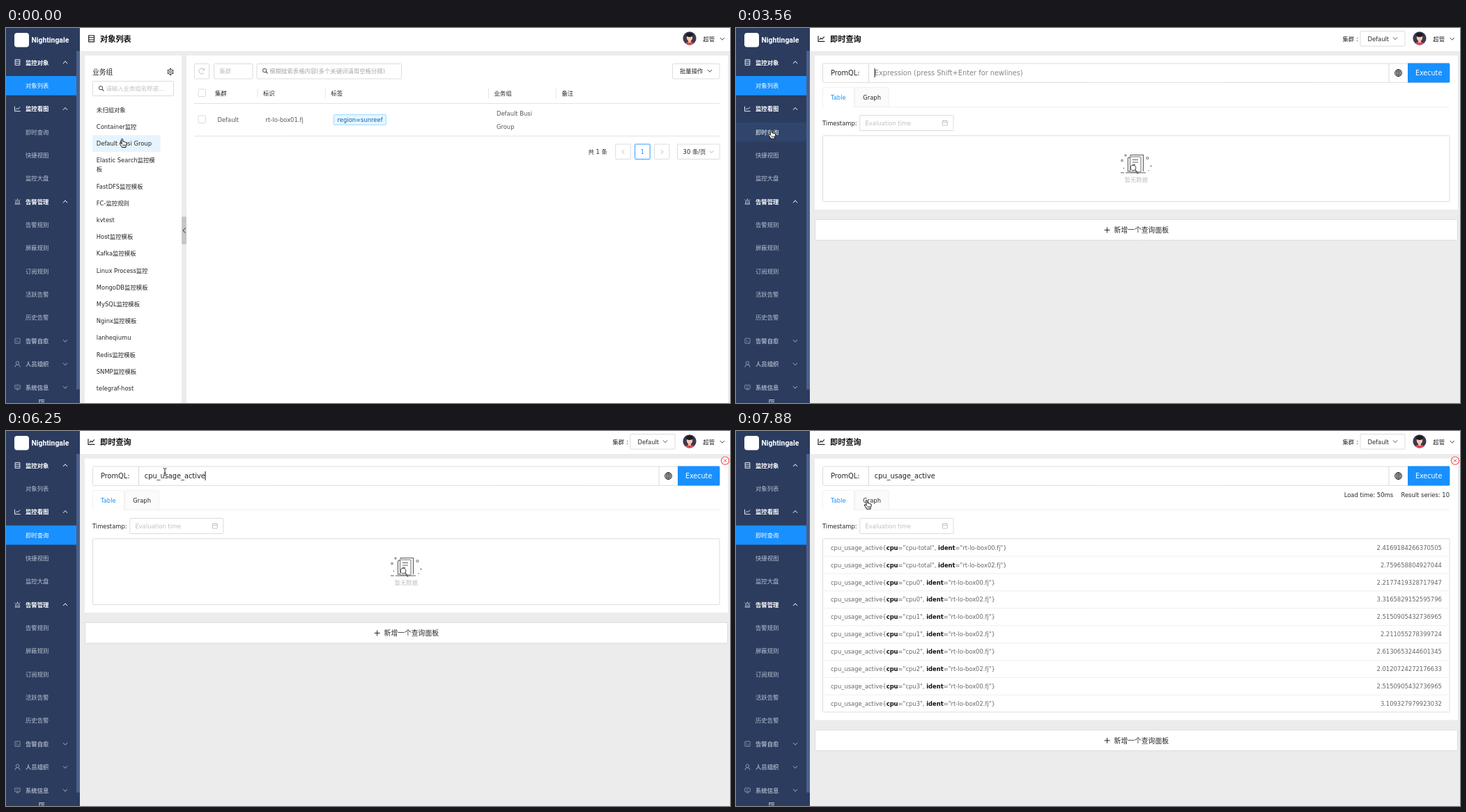
An HTML page with a canvas for the animation above (8000 ms loop, 1039 by 539 pixels).

```html
<!DOCTYPE html>
<html lang="zh-CN">
<head>
<meta charset="utf-8">
<title>监控</title>
<style>
html, body { margin: 0; width: 100%; height: 100%; overflow: hidden; background: #ececec; }
canvas { display: block; width: 1039px; height: 539px; }
</style>
</head>
<body>
<canvas id="stage"></canvas>
<script>
const W = 1039, H = 539, LOOP = 8000, TICK = 148.7;
const FONT = '"DejaVu Sans", "Noto Sans CJK SC", "Noto Sans CJK", sans-serif';
const BLUE = '#1890ff', NAVY = '#2b3c5f', LINE = '#d9d9d9', PALE = '#efefef';
const INK = '#262626', GREY = '#666', HINT = '#bfbfbf';
const canvas = document.getElementById('stage');
const dpr = window.devicePixelRatio || 1;
canvas.width = W * dpr;
canvas.height = H * dpr;
const c = canvas.getContext('2d');

// Drawing helpers; y of text is its visual centre
function text(s, x, y, color = INK, size = 8.4, weight = 400, align = 'left') {
  c.font = `${weight} ${size}px ${FONT}`;
  c.fillStyle = color;
  c.textAlign = align;
  c.fillText(s, x, y + size * 0.37);
  return c.measureText(s).width;
}
function box(x, y, w, h, fill, stroke, r = 0) {
  c.beginPath();
  c.roundRect(x, y, w, h, r);
  if (fill) { c.fillStyle = fill; c.fill(); }
  if (stroke) { c.strokeStyle = stroke; c.lineWidth = 0.9; c.stroke(); }
}
function path(pts, color, width = 1, close = false, fill) {
  c.beginPath();
  for (let i = 0; i < pts.length; i += 2) c.lineTo(pts[i], pts[i + 1]);
  if (close) c.closePath();
  if (fill) { c.fillStyle = fill; c.fill(); }
  c.strokeStyle = color;
  c.lineWidth = width;
  c.stroke();
}
function ring(x, y, r, color, width = 1, from = 0, to = Math.PI * 2) {
  c.beginPath();
  c.arc(x, y, r, from, to);
  c.strokeStyle = color;
  c.lineWidth = width;
  c.stroke();
}
function disc(x, y, r, color) {
  c.beginPath();
  c.arc(x, y, r, 0, Math.PI * 2);
  c.fillStyle = color;
  c.fill();
}
function chevron(x, y, dir, color, s = 3) {
  const d = s * 0.55 * dir;
  path([x - s, y - d, x, y + d, x + s, y - d], color, 1);
}
function sideChevron(x, y, dir, color, s = 3) {
  path([x - s * 0.55 * dir, y - s, x + s * 0.55 * dir, y, x - s * 0.55 * dir, y + s], color, 1);
}
function magnifier(x, y, color) {
  ring(x - 0.6, y - 0.6, 2.7, color);
  path([x + 1.4, y + 1.4, x + 3.8, y + 3.8], color, 1.1);
}

const icons = {
  list(x, y, col, s = 1) {
    path([x - 3.4 * s, y - 4 * s, x + 3.4 * s, y - 4 * s, x + 3.4 * s, y + 4 * s, x - 3.4 * s, y + 4 * s], col, s, true);
    for (const d of [-1.4, 1.4]) path([x - 3.4 * s, y + d * s, x + 3.4 * s, y + d * s], col, 0.9 * s);
  },
  chart(x, y, col, s = 1) {
    path([x - 4 * s, y - 3.5 * s, x - 4 * s, y + 3.5 * s, x + 4.2 * s, y + 3.5 * s], col, s);
    path([x - 2.4 * s, y + 1.4 * s, x - 0.6 * s, y - 0.8 * s, x + 0.8 * s, y + 0.6 * s, x + 3.6 * s, y - 2.6 * s], col, s);
  },
  alarm(x, y, col) {
    path([x - 2.4, y + 2.6, x - 2.4, y - 1, x - 1, y - 2.2, x + 1, y - 2.2, x + 2.4, y - 1, x + 2.4, y + 2.6], col, 0.9);
    path([x - 3.8, y + 3.4, x + 3.8, y + 3.4], col);
    path([x, y - 4.2, x, y - 3.2], col);
    path([x - 4, y - 2.8, x - 3.2, y - 2.2], col);
    path([x + 4, y - 2.8, x + 3.2, y - 2.2], col);
    path([x, y, x, y + 1.6], col, 0.9);
  },
  shell(x, y, col) {
    box(x - 3.6, y - 3.6, 7.2, 7.2, null, col, 0.5);
    path([x - 1.9, y - 1.6, x - 0.3, y, x - 1.9, y + 1.6], col, 0.8);
    path([x + 0.4, y + 1.7, x + 2.2, y + 1.7], col, 0.8);
  },
  person(x, y, col) {
    ring(x, y - 1.7, 2.2, col);
    ring(x, y + 4.4, 3.6, col, 1, Math.PI, Math.PI * 2);
  },
  screen(x, y, col) {
    box(x - 3.8, y - 3.2, 7.6, 5.2, null, col, 0.5);
    path([x - 2, y + 3.5, x + 2, y + 3.5], col, 0.9);
    path([x - 1.8, y - 0.6, x + 1.8, y - 0.6], col, 0.8);
  }
};

const menu = [
  ['监控对象', 'list', 1], ['对象列表'],
  ['监控看图', 'chart', 1], ['即时查询'], ['快捷视图'], ['监控大盘'],
  ['告警管理', 'alarm', 1], ['告警规则'], ['屏蔽规则'], ['订阅规则'], ['活跃告警'], ['历史告警'],
  ['告警自愈', 'shell', 0], ['人员组织', 'person', 0], ['系统信息', 'screen', 0]
];

function sidebar(k, cur) {
  box(0, 0, 106, H, NAVY);
  box(101, 33, 5, 487, '#4b608b', null, [0, 0, 2.5, 2.5]);
  box(12, 7, 21, 20.5, '#fff', null, 4);
  c.font = '700 10.4px Roboto, "Open Sans", sans-serif';
  c.fillStyle = '#fff';
  c.textAlign = 'left';
  c.fillText('Nightingale', 36.5, 20.8);

  const moved = Math.min(1, Math.max(0, (k - 24) / 2));
  menu.forEach(([label, icon, open], i) => {
    const y = 49.4 + 33.36 * i;
    if (icon) {
      const col = open ? '#fff' : '#a3adbf';
      icons[icon](16.5, y, open ? '#e3e7ee' : '#8c98ad');
      text(label, 28, y, col, 8.4, 700);
      chevron(85, y, open ? -1 : 1, col);
      return;
    }
    const share = i === 1 ? 1 - moved : i === 3 ? moved : 0;
    const over = cur.x < 101 && Math.abs(cur.y - y) < 13.8;
    if (over && k >= 24) box(0, y - 13.8, 101, 27.8, '#2f456c');
    c.globalAlpha = share;
    if (share) box(0, y - 13.8, 101, 27.8, BLUE);
    c.globalAlpha = 1;
    text(label, 28, y, share > 0.4 || over ? '#fff' : '#b8c0ce', 8.4, share > 0.4 || over ? 500 : 400);
  });
  path([47, 534.7, 55, 534.7], '#dfe4ec');
  path([50, 537.2, 55, 537.2], '#dfe4ec');
  path([49, 535.8, 47, 537.2, 49, 538.6], '#dfe4ec', 0.8);
}

function header(title, icon, withSelect) {
  box(106, 0, W - 106, 33, '#fff');
  icons[icon](122.6, 15.3, '#222', 1.15);
  text(title, 135, 15.8, '#111', 11.2, 700);
  if (withSelect) {
    text('集群 :', 870.5, 15.6);
    box(896, 4.5, 64, 21.5, '#fff', LINE, 1);
    text('Default', 906.5, 15.4);
    chevron(946, 15, 1, '#555');
  }
  // Faceless avatar
  c.save();
  c.beginPath();
  c.arc(981, 14.8, 9.6, 0, Math.PI * 2);
  c.clip();
  box(970, 4, 22, 22, '#3b3a4d');
  c.beginPath();
  c.ellipse(981, 25, 8, 5.2, 0, 0, Math.PI * 2);
  c.fillStyle = '#d8485a';
  c.fill();
  box(979, 16, 4, 5, '#eeb59c');
  c.beginPath();
  c.ellipse(981, 13.8, 4.2, 5, 0, 0, Math.PI * 2);
  c.fillStyle = '#f6c8b1';
  c.fill();
  c.beginPath();
  c.ellipse(981, 9.8, 5.2, 3.2, 0, 0, Math.PI * 2);
  c.fillStyle = '#1d1b27';
  c.fill();
  c.restore();
  text('超管', 1000.3, 16);
  chevron(1027.8, 15.6, 1, '#444');
}

const groups = ['未归组对象', 'Container监控', 'Default Busi Group', 'Elastic Search监控模|板', 'FastDFS监控模板',
  'FC-监控规则', 'kvtest', 'Host监控模板', 'Kafka监控模板', 'Linux Process监控', 'MongoDB监控模板', 'MySQL监控模板',
  'Nginx监控模板', 'lanheqiumu', 'Redis监控模板', 'SNMP监控模板', 'telegraf-host'];

function groupPanel(k, cur) {
  box(113, 39.5, 139, 500, '#fff');
  text('业务组', 124, 63.4, INK, 9.8, 500);
  for (let i = 0; i < 6; i++) {
    const a = i * Math.PI / 3 + Math.PI / 6;
    path([236 + 3.6 * Math.cos(a), 63 + 3.6 * Math.sin(a), 236 + 4.9 * Math.cos(a), 63 + 4.9 * Math.sin(a)], '#444', 1.9);
  }
  ring(236, 63, 3.6, '#444');
  ring(236, 63, 1.5, '#444', 0.9);
  box(124.5, 76.5, 116, 21, '#fff', cur.kind === 'beam' ? '#40a9ff' : LINE, 1);
  magnifier(136.6, 86.8, '#444');
  text('请输入业务组名称进...', 143.5, 87, HINT);
  let y = 117.5;
  for (const name of groups) {
    if (name.startsWith('Default')) box(124, y - 12, 97.6, 24, k < 4 ? '#e6f4ff' : '#e7f0fd');
    name.split('|').forEach((part, i) => text(part, 129.8, y + 13.2 * i));
    y += name.includes('|') ? 37.4 : 24.2;
  }
  box(252, 271, 7, 40, '#c6c6c6', null, 2);
  sideChevron(255.8, 291, -1, '#333', 3.6);
}

function objectPage(k, cur) {
  header('对象列表', 'list', false);
  groupPanel(k, cur);
  box(259, 39.5, 777, 500, '#fff');

  box(270.5, 51.5, 21, 21.5, '#fff', LINE, 1);
  ring(280.8, 62, 4, HINT, 1, 0.6, Math.PI * 2 - 0.5);
  path([284.8, 58.2, 284.6, 60.6, 282.2, 60.4], HINT, 1);
  box(298.5, 51.5, 55.5, 21.5, '#fff', LINE, 1);
  text('集群', 306.5, 62, HINT);
  box(360, 51.5, 207.5, 21.5, '#fff', LINE, 1);
  magnifier(371.8, 61.6, '#444');
  text('模糊搜索表格内容(多个关键词请用空格分隔)', 378.3, 62, '#a6a6a6');
  box(956.5, 51.5, 67.5, 21.5, '#fff', LINE, 1);
  text('批量操作', 967, 62);
  chevron(1010, 61.6, 1, '#444');

  const cols = [['集群', 300], ['标识', 369], ['标签', 466.3], ['业务组', 700.5], ['备注', 797.4]];
  cols.forEach(([name, x], i) => {
    text(name, x, 94, INK, 8.4, 500);
    if (i) path([x - 8, 87, x - 8, 101], '#e6e6e6');
  });
  for (const y of [88, 126]) box(276, y, 10.5, 10.5, '#fff', LINE, 1);
  path([270, 108.5, 1024, 108.5], '#e2e2e2');
  path([270, 155.3, 1024, 155.3], '#e2e2e2');
  text('Default', 303.5, 132, '#555');
  text('rt-lo-box01.fj', 372.6, 132, '#555');
  box(470.3, 124.6, 75, 14.6, '#e6f7ff', '#91d5ff', 1);
  text('region=sunreef', 475.6, 132, '#0b5cad');
  text('Default Busi', 704, 122.6, '#555');
  text('Group', 704, 142, '#555');

  text('共 1 条', 835.5, 178);
  box(874.8, 167, 21.6, 21.5, '#fff', LINE, 1);
  sideChevron(885.5, 178, -1, HINT);
  box(902.6, 167, 21.6, 21.5, '#fff', BLUE, 1);
  text('1', 913.4, 178, BLUE, 8.4, 500, 'center');
  box(930.4, 167, 21.6, 21.5, '#fff', LINE, 1);
  sideChevron(941.4, 178, 1, HINT);
  box(963.5, 167, 60.8, 21.5, '#fff', LINE, 1);
  text('30 条/页', 971.6, 178);
  chevron(1012.4, 178, 1, HINT);
}

function emptyArt() {
  const col = '#5c5c5c';
  path([552, 208, 557, 208], col);
  path([559, 208, 588, 208], col);
  path([565, 206, 562.5, 206, 562.5, 187, 565.5, 185], col, 1.1);
  path([566, 184, 566, 182.5, 584.5, 182.5, 584.5, 206], col, 1.1);
  box(565.5, 185, 15.5, 22, '#fff', col, 1);
  for (const [y, w] of [[189.5, 8], [193, 8], [196.5, 4]]) path([569, y, 569 + w, y], col);
  ring(570, 201, 3.8, col, 1.2);
  path([572.8, 203.8, 577, 209.5], col, 1.6);
  ring(554, 190.5, 1.4, col, 0.9);
  ring(590.5, 187, 1.6, col, 0.9);
  path([557, 183, 561, 183], col, 0.8);
  path([559, 181, 559, 185], col, 0.8);
  disc(556.5, 201.5, 0.8, col);
  disc(595.5, 198.5, 0.9, col);
  disc(592, 205, 0.7, col);
  text('暂无数据', 574.3, 218.3, HINT, 8.4, 400, 'center');
}

const values = ['2.4169184266370505', '2.759658804927044', '2.2177419328717947', '3.3165829152595796',
  '2.5150905432736965', '2.211055278399724', '2.6130653244601345', '2.0120724272176633',
  '2.5150905432736965', '3.109327979923032'];

function results() {
  text('Load time: 50ms', 943, 92, INK, 8.4, 400, 'right');
  text('Result series: 10', 1024, 92, INK, 8.4, 400, 'right');
  values.forEach((v, i) => {
    const y = 167.6 + 24.92 * i;
    const cpu = i < 2 ? 'cpu-total' : 'cpu' + ((i >> 1) - 1);
    const parts = ['cpu_usage_active{', '*cpu', `="${cpu}", `, '*ident', `="rt-lo-box0${i % 2 * 2}.fj"}`];
    let x = 136;
    for (const p of parts) {
      const key = p[0] === '*';
      x += text(key ? p.slice(1) : p, x, y, key ? '#111' : GREY, 8.4, key ? 700 : 400);
    }
    text(v, 1012.8, y, GREY, 8.4, 400, 'right');
    if (i) path([124, y - 12.5, 1024, y - 12.5], PALE);
  });
}

const metrics = ['active', 'guest', 'guest_nice', 'idle', 'iowait', 'irq', 'nice', 'softirq', 'steal', 'system', 'user'];

function suggestions(typed) {
  box(198.5, 76, 396, 238.5, '#fff', '#ddd');
  metrics.forEach((m, i) => {
    const y = 87 + 21.6 * i;
    if (!i) box(199, y - 10.5, 395, 21.4, '#d6ebff');
    const w = text(typed, 210, y, '#111', 8.4, 700);
    text(('cpu_usage_' + m).slice(typed.length), 210 + w, y, '#333');
  });
}

// Caret flips every few ticks
const flips = [24, 28, 31, 34, 36, 40, 42, 45, 48, 51];
const caretOn = k => flips.filter(f => f <= k).length % 2 === 1;

function queryPage(k, cur) {
  const done = k >= 44;
  const typed = k >= 42 ? 'cpu_usage_active' : k >= 37 ? 'cpu' : k >= 36 ? 'cp' : '';
  const grow = done ? 154.5 : 0;
  header('即时查询', 'chart', true);
  box(113, 39.5, 923, 221.5 + grow, '#fff');

  box(124.5, 51, 899.5, 27.3, '#fff', LINE, 1.5);
  path([190.5, 51, 190.5, 78], LINE);
  path([937, 51, 937, 78], LINE);
  text('PromQL:', 136, 64.7, INK, 9.8);
  text(typed || 'Expression (press Shift+Enter for newlines)', 198.8, 64.6, typed ? '#222' : '#858585', 9.8);
  c.font = `9.8px ${FONT}`;
  const caretX = 198.8 + c.measureText(typed).width;
  if (caretOn(k)) box(caretX - 0.2, 58, 1, 13, '#111');
  ring(950.5, 64.6, 5, '#222', 0.9);
  c.beginPath();
  c.ellipse(950.5, 64.6, 2.3, 5, 0, 0, Math.PI * 2);
  c.stroke();
  path([950.5, 59.6, 950.5, 69.6], '#222', 0.8);
  for (const [d, w] of [[-2.3, 4.4], [0, 5], [2.3, 4.4]]) path([950.5 - w, 64.6 + d, 950.5 + w, 64.6 + d], '#222', 0.8);
  box(964, 50.6, 60.3, 28, BLUE, null, [0, 1.5, 1.5, 0]);
  text('Execute', 994.1, 64.7, '#fff', 9.6, 400, 'center');

  path([124, 113.3, 1024, 113.3], PALE);
  box(124.5, 85.5, 44.8, 28, '#fff', PALE, [1.5, 1.5, 0, 0]);
  path([125, 113.4, 169, 113.4], '#fff', 1.4);
  box(170.7, 85.5, 48.6, 27.8, '#fbfbfb', PALE, [1.5, 1.5, 0, 0]);
  text('Table', 136, 99.8, BLUE);
  text('Graph', 182.3, 99.8);

  text('Timestamp:', 124, 136.6);
  box(177.7, 125.5, 134.3, 22, '#fff', LINE, 1);
  text('Evaluation time', 185.5, 136.6, HINT);
  box(296.3, 133.4, 7, 6.6, null, HINT, 0.5);
  path([296.3, 135.8, 303.3, 135.8], HINT, 0.9);
  for (const x of [298.2, 301.4]) path([x, 132.2, x, 134.2], HINT, 0.9);

  box(124.5, 154.8, 899.5, done ? 249.2 : 94.7, '#fff', LINE, 1);
  if (done) results(); else emptyArt();

  box(113.5, 275.3 + grow, 922, 29.8, '#fff', LINE, 1);
  const y = 290.4 + grow;
  path([528.6, y, 536.6, y], '#222');
  path([532.6, y - 4, 532.6, y + 4], '#222');
  text('新增一个查询面板', 542.6, y + 0.1, INK, 9.8);

  if (cur.x > 113) {
    disc(1032, 42.6, 6, '#fff');
    ring(1032, 42.6, 5.6, '#f5484d', 1.1);
    path([1029.8, 40.4, 1034.2, 44.8], '#f5484d');
    path([1034.2, 40.4, 1029.8, 44.8], '#f5484d');
  }
  if (k >= 36 && k < 42) suggestions(typed);
}

// Pointer moves: start tick, end tick, start, bend, end
const moves = [
  [3, 8, 167, 159, 195, 34, 211, 127],
  [11, 21, 211, 127, 135, 185, 50.5, 146.5],
  [27, 31, 50.5, 146.5, 130, 70, 228, 59],
  [47, 53, 228, 59, 44, 153, 188, 99.5]
];

function pointer(k) {
  const m = moves.filter(v => v[0] <= k).pop() || moves[0];
  const [from, to, x0, y0, x1, y1, x2, y2] = m;
  let u = Math.min(1, Math.max(0, (k - from) / (to - from)));
  if (from === 11) u = 1 - (1 - u) ** 2;
  const v = 1 - u;
  const x = v * v * x0 + 2 * u * v * x1 + u * u * x2;
  const y = v * v * y0 + 2 * u * v * y1 + u * u * y2;
  const inside = (l, t, r, b) => x >= l && x <= r && y >= t && y <= b;
  const first = k < 24;
  let kind = 'arrow';
  if (x < 101 || (first ? inside(124, 106, 222, 530) : inside(124, 85, 220, 113))) kind = 'hand';
  else if (first ? inside(124, 76, 241, 98) : inside(190, 50, 937, 79)) kind = 'beam';
  return { x, y, kind };
}

function drawPointer({ x, y, kind }) {
  c.save();
  c.translate(x, y);
  c.lineJoin = 'round';
  if (kind === 'beam') {
    for (const [col, w] of [['#fff', 2.2], ['#222', 1]]) {
      path([-2.4, -5.5, -0.8, -5.3, 0, -4.4, 0.8, -5.3, 2.4, -5.5], col, w);
      path([0, -4.4, 0, 4.4], col, w);
      path([-2.4, 5.5, -0.8, 5.3, 0, 4.4, 0.8, 5.3, 2.4, 5.5], col, w);
      path([-1.4, 1.4, 1.4, 1.4], col, w);
    }
  } else if (kind === 'hand') {
    path([-1.4, 0.8, -0.4, 0, 0.6, 0.8, 1, 4.4, 2.6, 4.2, 3.2, 5, 4.4, 4.8, 5, 5.6, 6, 5.8, 6.2, 8,
      5, 10.6, 5, 12.6, -0.6, 12.6, -1.6, 10.4, -3.8, 7.4, -3.2, 6.2, -2, 6.6, -0.8, 7.8], '#111', 1, true, '#fff');
    for (const d of [0.8, 2.4, 4]) path([d, 8.4, d, 10.8], '#111', 0.7);
  } else {
    path([0, 0, 0, 11.4, 2.7, 9, 4.5, 13, 6.3, 12.2, 4.6, 8.3, 8, 8], '#fff', 1, true, '#111');
  }
  c.restore();
}

function draw(now) {
  const t = now % LOOP;
  const k = Math.floor((t + 10) / TICK);
  const cur = pointer(k);
  c.setTransform(dpr, 0, 0, dpr, 0, 0);
  box(0, 0, W, H, '#ececec');
  (k < 24 ? objectPage : queryPage)(k, cur);
  sidebar(k, cur);
  drawPointer(cur);
}

let start;
function frame(now) {
  if (start === undefined) start = now;
  draw(now - start);
  requestAnimationFrame(frame);
}
draw(0);
requestAnimationFrame(frame);
</script>
</body>
</html>
```
